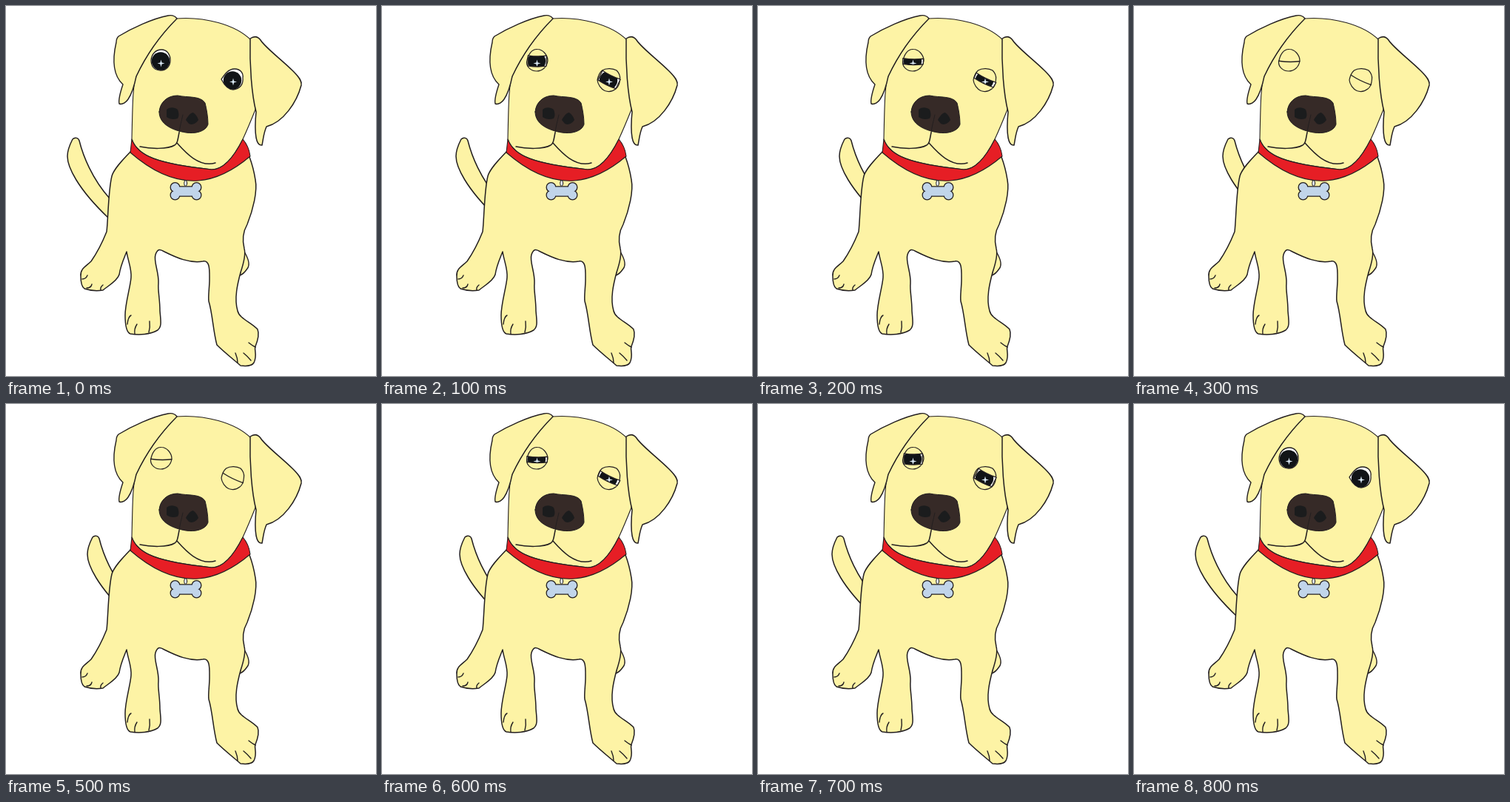
An HTML page with a canvas for the animation above (900 ms loop, 500 by 500 pixels).

```html
<!DOCTYPE html>
<html lang="en">
<head>
<meta charset="utf-8">
<title>Puppy</title>
<style>
  html, body { margin: 0; width: 100%; height: 100%; overflow: hidden; background: #fff; }
  canvas { display: block; width: 100vmin; height: 100vmin; }
</style>
</head>
<body>
<canvas id="stage"></canvas>
<script>
const SIZE = 500, LOOP = 900;
const FUR = '#fdf3a5', INK = '#231f20', RED = '#e61e25', STEEL = '#c1d5ea';
const NOSE = '#362a27', NOSTRIL = '#1b1c1d', PUPIL = '#111417';

const canvas = document.getElementById('stage');
const ctx = canvas.getContext('2d');

// start time, tail shift in px, lid opening [upper, lower]; null means wide open
const HALF = [-7, 7], DROWSY = [-3, 4.5], SHUT = [0.5, 0.5];
const POSES = [
  { at: 0, tail: 0, lids: null },
  { at: 100, tail: 17, lids: HALF },
  { at: 200, tail: 27, lids: DROWSY },
  { at: 300, tail: 37, lids: SHUT },
  { at: 500, tail: 27, lids: SHUT },
  { at: 600, tail: 22, lids: DROWSY },
  { at: 700, tail: 17, lids: HALF },
  { at: 800, tail: 0, lids: null }
];

const path = d => new Path2D(d);

const TAIL = path('M138 286C96 246 83 217 83 203C83 193 88 184 90 180C93 177 98 178 99 182' +
  'C104 202 116 233 140 260L160 290Z');
const HIND = path('M322 332C328 342 330 350 326 355C322 361 319 363 316 364Z');
const BODY = path('M169 196C160 206 146 219 143 230C138 250 138 290 136 305C130 320 122 335 115 345' +
  'C108 352 100 355 101 365C101 375 103 380 106 382C115 385 125 385 131 384C138 378 150 372 153 363' +
  'C155 350 160 340 163 332C165 345 170 355 169 367C168 380 161 402 161 418C161 432 163 441 168 443' +
  'C180 445 195 444 205 438C211 433 209 425 208 412C208 395 205 385 206 375C207 360 199 345 202 336' +
  'C205 327 209 329 214 332C230 340 248 348 266 345C276 343 275 358 275 370C275 380 273 392 274 399' +
  'C279 415 280 440 285 458C295 468 308 478 317 486C325 487 332 487 335 482C340 472 335 465 337 460' +
  'C341 450 342 442 340 437C332 428 315 422 313 412C308 395 313 375 317 360C322 345 324 335 322 328' +
  'C318 312 322 302 326 295C334 275 340 250 337 235C335 222 332 212 329 204Z');
const TOES = path('M103 369Q108 369 110 364M109 381Q115 381 116 376M128 384Q127 380 131 377' +
  'M164 430Q165 420 169 418M174 443Q173 436 177 430M193 441Q195 434 194 426' +
  'M313 482Q313 476 310 469M331 479Q326 473 321 469M337 461Q333 459 328 455');
const HEAD = path('M230 17C268 14 310 25 331 46L337 140C331 155 326 167 320 180C306 208 292 221 278 221' +
  'C205 213 178 203 170 180C171 140 171 105 176 95C190 65 210 38 230 17Z');
const COLLAR = path('M170 180C178 203 205 213 278 221C292 221 306 208 320 180C327 188 329 195 330 203' +
  'C310 220 285 234 260 236C232 238 200 226 168 198Z');
const LEFT_EAR = path('M231 17C228 13 224 12 219 13C198 17 170 30 152 41C150 43 149 46 149 49' +
  'C143 75 146 95 158 106C154 118 152 128 153 132C158 134 163 129 165 126C171 117 174 105 176 95' +
  'C190 65 210 38 231 17Z');
const RIGHT_EAR = path('M330 44C336 40 341 42 344 46C350 56 372 72 388 88C397 97 400 102 399 107' +
  'C393 130 375 157 352 163C348 172 348 178 346 188C341 189 339 183 338 178C336 166 337 153 338 143' +
  'C332 120 329 80 330 44Z');
const MOUTH = path('M234 171C232 181 232 185 228 188C218 194 195 193 181 190M231 185C240 195 260 219 283 212');
const SNOUT = path('M207 143C208 130 218 121 232 121C245 124 263 121 269 131C271 139 273 150 273 160' +
  'C270 170 255 173 243 171C225 168 207 160 207 143Z');
const CREASE = path('M239 147C237 156 235 163 234 171');
const NOSTRILS = path('M217 140C222 136 228 137 232 140C234 145 234 149 232 152C226 154 221 153 217 150Z' +
  'M243 154C246 148 250 144 253 144C257 147 259 150 260 154C256 160 251 161 247 159Z');

// rim: outline of the lids; open: visible eyeball when wide awake
const EYES = [
  { x: 209.7, y: 74, tilt: 1, rx: 14.2, ry: 14.8, iris: [209, 74.5], star: [209.5, 77.5],
    rim: path('M195.5 76C197 66 202 58 210 58.5C217 58.5 224 66 224 74C223 82 217 88 209 88C202 88 195.5 83 195.5 76Z'),
    open: path('M196 73C197 65 202 59 210 59C218 59 222 66 222 73C222 81 217 87 209 87C201 87 196 82 196 73Z') },
  { x: 307, y: 99.5, tilt: 26, rx: 15.2, ry: 15, iris: [306, 100.5], star: [307, 102.5],
    rim: path('M291 100C292 95 294 90 297.5 87C303 83.5 312 84 317 87C321 91 322 95 321.5 99' +
      'C321 106 319 110 316 112C311 116 305 116 301 114.5C296 112 291.5 106 291 100Z'),
    open: path('M291 99C295 93 300 85 309 85C317 85 321 91 320 97C321 106 316 112 307 113C299 113 294 105 291 99Z') }
];

function shape(p, fill, width) {
  ctx.fillStyle = fill;
  ctx.fill(p);
  if (width) line(p, width);
}

function line(p, width) {
  ctx.strokeStyle = INK;
  ctx.lineWidth = width;
  ctx.stroke(p);
}

function disc(x, y, rx, ry = rx) {
  const p = new Path2D();
  p.ellipse(x, y, rx, ry, 0, 0, Math.PI * 2);
  return p;
}

function drawStar(x, y) {
  const p = new Path2D();
  for (let i = 0; i < 8; i++) {
    const d = i % 2 ? 1.5 : 5, a = i * Math.PI / 4;
    p.lineTo(x + d * Math.cos(a), y + d * Math.sin(a));
  }
  p.closePath();
  shape(p, '#dcebf7');
}

function drawBall(eye, gap) {
  ctx.save();
  ctx.clip(gap);
  shape(gap, '#fff');
  shape(disc(...eye.iris, 12.2), PUPIL);
  drawStar(...eye.star);
  ctx.restore();
  line(gap, 1.3);
}

function drawEye(eye, lids) {
  if (!lids) return drawBall(eye, eye.open);
  const [up, low] = lids, sag = 2;
  const edge = y => eye.rx * Math.sqrt(1 - (y / eye.ry) ** 2);
  const a = edge(up), b = edge(low);
  const turn = new DOMMatrix().translate(eye.x, eye.y).rotate(eye.tilt);
  const gap = new Path2D();
  gap.addPath(path(`M${-a} ${up}Q0 ${up + sag} ${a} ${up}L${b} ${low}Q0 ${low + sag} ${-b} ${low}Z`), turn);
  shape(eye.rim, FUR, 1.2);
  drawBall(eye, gap);
}

function drawTag() {
  const parts = [[228.5, 245], [228.5, 255.5], [257.5, 245], [257.5, 255.5]].map(c => disc(...c, 5.7));
  const bar = new Path2D();
  bar.rect(230, 244.5, 26, 12);
  parts.push(bar);
  parts.forEach(p => line(p, 2.6));
  parts.forEach(p => shape(p, STEEL));
  shape(disc(242.7, 239.5, 2, 3.8), '#e4edf5', 1);
}

function draw(pose) {
  ctx.fillStyle = '#fff';
  ctx.fillRect(0, 0, SIZE, SIZE);
  ctx.lineJoin = ctx.lineCap = 'round';

  ctx.save();
  ctx.translate(pose.tail, 0);
  shape(TAIL, FUR, 1.5);
  ctx.restore();

  shape(HIND, FUR, 1.4);
  shape(BODY, FUR, 1.5);
  line(TOES, 1.4);
  shape(HEAD, FUR, 1.1);
  shape(COLLAR, RED, 1.1);
  drawTag();
  shape(LEFT_EAR, FUR, 1.4);
  shape(RIGHT_EAR, FUR, 1.5);
  line(MOUTH, 1.5);
  shape(SNOUT, NOSE, 1);
  line(CREASE, 1);
  shape(NOSTRILS, NOSTRIL);
  EYES.forEach(eye => drawEye(eye, pose.lids));
}

function frame(now) {
  const t = now % LOOP;
  const px = Math.round(Math.min(innerWidth, innerHeight) * devicePixelRatio);
  if (canvas.width !== px) canvas.width = canvas.height = px;
  ctx.setTransform(px / SIZE, 0, 0, px / SIZE, 0, 0);
  draw(POSES.findLast(p => p.at <= t));
}

const start = performance.now();
function tick() {
  frame(performance.now() - start);
  requestAnimationFrame(tick);
}
tick();
</script>
</body>
</html>
```
